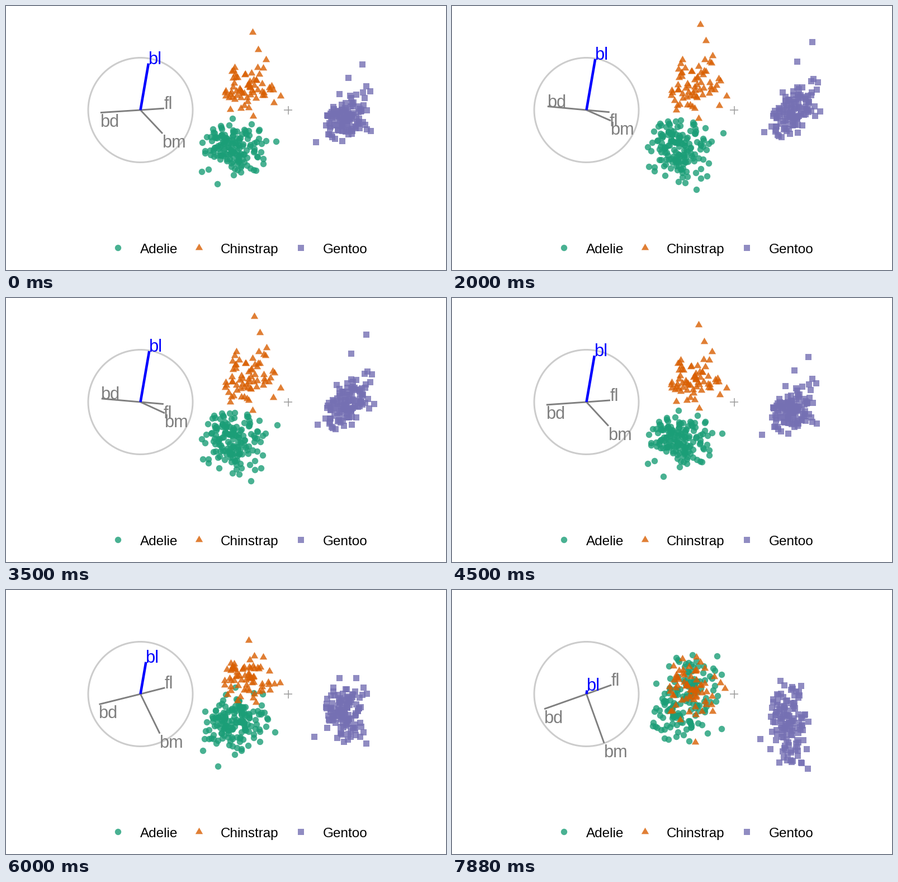
These frames come from a looping animation (787x472 px, 8 s). A matplotlib script:

```python
import numpy as np
import matplotlib.pyplot as plt
from matplotlib.animation import FuncAnimation

W, H, DPI = 787, 472, 64
STEP, LOOP = 20, 8000
PX = 72 / DPI                      # points per pixel
DIAL, RADIUS = (240.5, 186), 93.5
CLOUD = (504.5, 186)

# The tour turns "bl" out of the view along one fixed direction.
P = np.array([0.17, 0.985])        # direction of bl on screen, y up
Q = np.array([0.985, -0.17])       # direction that never changes

# name: (part along Q, part along P at angle 0, part along P at a right angle)
AXES = {
    "bd": (-0.747, 0, -0.42),
    "fl": (0.442, 0, 0.253),
    "bm": (0.493, 0, -0.87),
    "bl": (0, 1, 0),
}

rng = np.random.default_rng(7)


def species(count, mean, sex_gap, spread, *far):
    """Two overlapping normal clouds, one per sex, and a few far points."""
    n = count - len(far)
    sex = np.where(np.arange(n) % 2, 1, -1)[:, None]
    z = 2.3 * np.tanh(rng.standard_normal((n, 3)) / 2.1)
    body = np.array(mean) + sex * np.array(sex_gap) + z * np.array(spread)
    return np.vstack([body, far])


ADELIE = species(151, (-81, -80, -18), (-5, 17, -34), (28, 26, 26),
                 (-42, -163, 73), (-102, -125, -91),
                 (-141, -93, 2), (-12, -35, -63))
CHINSTRAP = species(68, (-70, 31, -3), (-2, 26, -20), (24, 21, 23),
                    (-86, 143, -8), (-71, 118, -21),
                    (-54, 91, -103), (-18, 22, 5))
GENTOO = species(123, (103, 24, -37), (8, 22, -27), (17, 20, 25),
                 (117, 159, -94), (96, 116, -69),
                 (152, 40, -112), (59, -20, -70))


def tour_angle(t):
    """Steps of 0.15 rad each 500 ms: down to zero, a pause, then up."""
    if t < 2500:
        return 0.44 - 0.15 * max(0, (t - 1000) // 500)
    steps = 10 if t >= 7880 else max(0, (t - 3000) // 500)
    return 0.15 * steps


def project(data, angle, origin, scale=1.0):
    """Screen positions of (q, a, b) rows at a tour angle."""
    data = np.atleast_2d(data)
    along = data[:, 1] * np.cos(angle) + data[:, 2] * np.sin(angle)
    xy = scale * (np.outer(data[:, 0], Q) + np.outer(along, P))
    return origin[0] + xy[:, 0], origin[1] - xy[:, 1]


plt.rcParams["font.family"] = "Liberation Sans"
fig = plt.figure(figsize=(W / DPI, H / DPI), dpi=DPI, facecolor="white")
ax = fig.add_axes([0, 0, 1, 1])
ax.set_xlim(0, W)
ax.set_ylim(H, 0)
ax.axis("off")


def stroke(x, y, color, width, z=2):
    line, = ax.plot(x, y, color=color, lw=width * PX, zorder=z,
                    solid_capstyle="butt")
    return line


def marks(x, y, style):
    marker, size, color = style
    line, = ax.plot(x, y, ls="none", marker=marker, ms=size * PX, mew=0,
                    color=color, alpha=0.8, zorder=3)
    return line


def label(x, y, text, size, color):
    return ax.text(x, y, text, fontsize=size * PX, color=color,
                   ha="left", va="baseline", zorder=4)


turn = np.linspace(0, 2 * np.pi, 200)
stroke(DIAL[0] + RADIUS * np.cos(turn), DIAL[1] + RADIUS * np.sin(turn),
       "#cccccc", 3, 1)
cx, cy = CLOUD
stroke([cx - 7.5, cx + 7.5], [cy, cy], "#999999", 1.5)
stroke([cx, cx], [cy - 7.5, cy + 7.5], "#999999", 1.5)

DOT = ("o", 11.4, "#1b9e77")
TRIANGLE = ((3, 0, 0), 15.4, "#d95f02")
SQUARE = ("s", 11, "#7570b3")

clouds = [(data, marks([], [], style)) for data, style in
          ((ADELIE, DOT), (CHINSTRAP, TRIANGLE), (GENTOO, SQUARE))]

for name, x, text_x, style in (("Adelie", 200, 239.7, DOT),
                               ("Chinstrap", 345, 383.3, TRIANGLE),
                               ("Gentoo", 527, 566.3, SQUARE)):
    marks([x], [432.4], style)
    label(text_x, 442, name, 24.3, "black")

arms = []
for name, row in AXES.items():
    main = name == "bl"
    color = "#0000ff" if main else "#7f7f7f"
    arms.append((row, stroke([], [], color, 4.6 if main else 2.9),
                 label(0, 0, name, 30.8, color)))


def update(i):
    angle = tour_angle(i * STEP)
    for data, dots in clouds:
        dots.set_data(*project(data, angle, CLOUD))
    for row, line, text in arms:
        (x,), (y,) = project(row, angle, DIAL, RADIUS)
        line.set_data([DIAL[0], x], [DIAL[1], y])
        below = y > DIAL[1] - 0.5
        text.set_position((x - 0.3, y + (25 if below else 1)))
    return [dots for _, dots in clouds]


anim = FuncAnimation(fig, update, frames=LOOP // STEP, interval=STEP,
                     repeat=True, repeat_delay=0, blit=False)
plt.show()
```
